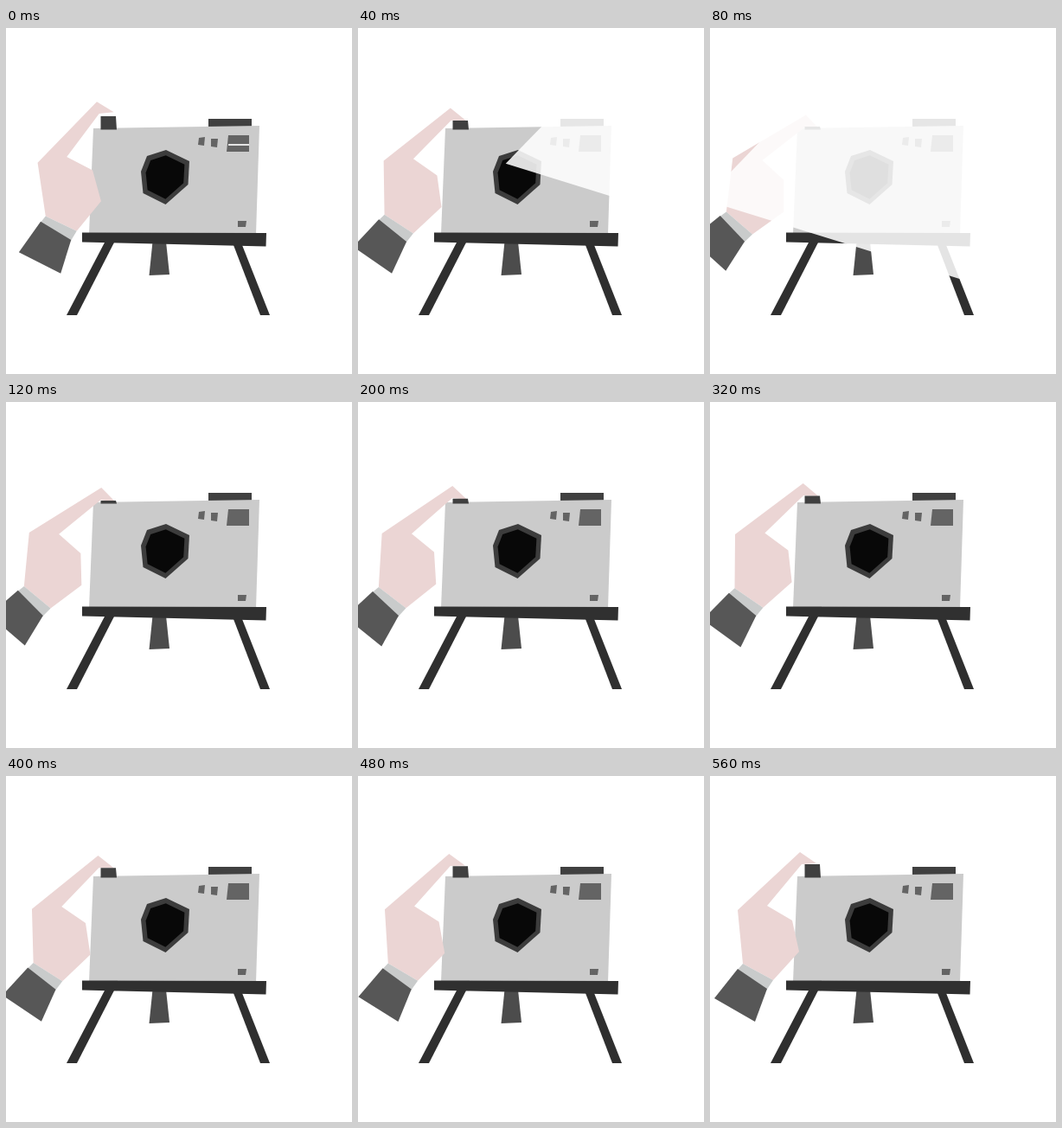
Recreate the animation shown at these times as an HTML page. Size 400x400 px, loop 600 ms.

```html
<!DOCTYPE html>
<html lang="en">
<head>
<meta charset="utf-8">
<title>Camera click</title>
<style>
  html, body { margin: 0; width: 100%; height: 100%; overflow: hidden; background: #fff; }
  svg { display: block; width: 100vw; height: 100vh; }
</style>
</head>
<body>
<svg viewBox="0 0 400 400">
  <defs>
    <path id="lens" d="M185 141L212 154L210.500 181L184.500 204L158.500 191L156 166L163 148Z"/>
  </defs>
  <g fill="#2f2f2f">
    <path d="M114 248H125L82 332H70Z"/>
    <path d="M263 251H273L305 332H294Z"/>
  </g>
  <path fill="#4c4c4c" d="M169.500 247H185L189 285L165.500 286Z"/>
  <path fill="#404040" d="M234 105H284V116H234Z"/>
  <path fill="#cbcbcb" d="M101 116L293 113L289 238H96Z"/>
  <path fill="#303030" d="M88 236.500L301 237L300.500 252.500L88 247.500Z"/>
  <use href="#lens" fill="#3c3c3c"/>
  <use href="#lens" fill="#080808" transform="translate(184 172.500) scale(.8) translate(-184 -172.500)"/>
  <g fill="#646464">
    <path d="M257 124H281V143H255Z"/>
    <path d="M223 127L230 126L229 136L222 135Z"/>
    <path d="M237 128H245L244 138L237 137Z"/>
    <path d="M268 223H278L277 230H268Z"/>
  </g>
  <path id="glint" fill="#e4e4e4" d="M257 134H281V136H257Z"/>
  <g id="hand">
    <path fill="#ebd5d4" d="M104 88L123 101L106 102L66 150L95 167L103 203L73 236L38 217L32 155Z"/>
    <path fill="#c9cbcb" d="M38 217L73 236L65 248L31 225Z"/>
    <path fill="#575757" d="M32 223L66 246L52 284L5 257Z"/>
  </g>
  <path id="button" fill="#404040"/>
  <path id="flash" fill="#fff" fill-opacity=".87" d="M-7 198.500L62 127L150 37L460 20V343Z"/>
</svg>
<script>
const el = id => document.getElementById(id);
const STEP = 40, LOOP = 600, CLICK = 80, RELEASE = 120, LAST = LOOP - STEP;

const lerp = (a, b, k) => a + (b - a) * k;
const show = (node, on) => node.style.display = on ? "" : "none";

// 1 = button fully down, 0 = released, negative = hand pulled back
function pressAt(t) {
  return t <= CLICK
    ? lerp(-0.27, 1.12, t / CLICK)
    : lerp(1, 0, (t - RELEASE) / (LAST - RELEASE));
}

function draw(time) {
  const t = Math.floor((time % LOOP) / STEP) * STEP;
  const press = pressAt(t);

  const pullX = 11 * Math.max(0, -press);
  el("hand").setAttribute("transform",
    `translate(${pullX} ${2 * press}) rotate(${11 * press} 60 125)`);

  const top = 102 + 12 * Math.min(1, Math.max(0, press));
  el("button").setAttribute("d", `M109.500 ${top}H127L128 117.500H109.500Z`);

  // The flash grows out of its window, then cuts off
  const size = t <= CLICK ? (t / CLICK) ** 1.5 : 0;
  show(el("glint"), t === 0);
  show(el("flash"), size > 0);
  el("flash").setAttribute("transform",
    `translate(268 134) scale(${size}) translate(-268 -134)`);
}

const start = performance.now();
function tick() {
  draw(performance.now() - start);
  requestAnimationFrame(tick);
}
tick();
</script>
</body>
</html>
```
